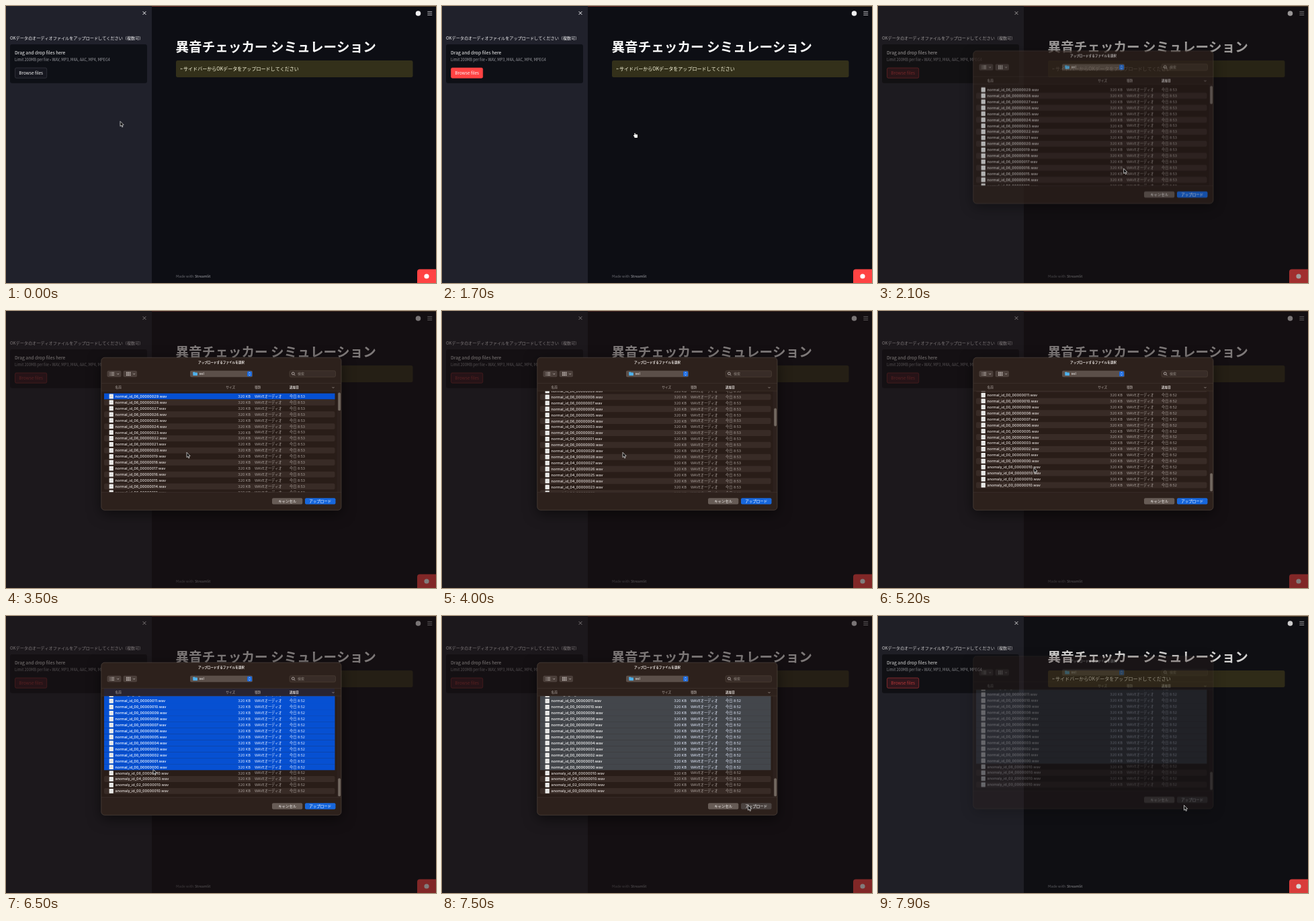
Recreate the animation shown at these times as an HTML page with a canvas. Size 640x412 px, loop 8 s.

```html
<!DOCTYPE html>
<html lang="ja">
<head>
<meta charset="utf-8">
<title>異音チェッカー シミュレーション</title>
<style>
  html, body { margin: 0; width: 100%; height: 100%; overflow: hidden; background: #0d0e14; }
  canvas { display: block; width: 640px; height: 412px; }
</style>
</head>
<body>
<canvas id="stage"></canvas>
<script>
const W = 640, H = 412, LOOP = 8000, STEP = 100;
const PAGE = '"Noto Sans CJK JP", "Noto Sans CJK", sans-serif';
const MAC = 'Inter, "Noto Sans CJK JP", "Noto Sans CJK", sans-serif';
const ROW = 8.93, ROWS = 124, MAX_SCROLL = 965;
const scale = Math.max(1, window.devicePixelRatio || 1);

function setup(canvas) {
  canvas.width = W * scale;
  canvas.height = H * scale;
  const ctx = canvas.getContext('2d');
  ctx.scale(scale, scale);
  return ctx;
}
const stage = setup(document.getElementById('stage'));
const sheet = setup(document.createElement('canvas'));
let g = stage;

// Key points: [time, value, value...]
const cursorKeys = [
  [300, 170, 171.5], [900, 36, 98], [1100, 36, 98], [1400, 285, 189],
  [1700, 285, 189], [2400, 418, 276], [2900, 173.5, 129], [3100, 173.5, 129],
  [3500, 269, 210.3], [4900, 269, 210.3], [5200, 232, 233], [5500, 219, 235],
  [6000, 219, 228], [6500, 219, 228], [7300, 455.5, 281.5]
];
const scrollKeys = [
  [3700, 0], [3900, 90], [4200, 380], [4500, 552.7], [4600, 560],
  [4900, 860], [5100, 965.5], [5200, 966.4], [5500, MAX_SCROLL]
];

const clamp = v => Math.min(1, Math.max(0, v));
const ramp = (t, from, to) => clamp((t - from) / (to - from));
const smooth = p => p * p * (3 - 2 * p);

function track(keys, t, ease = p => p) {
  let i = 0;
  while (i < keys.length - 2 && t > keys[i + 1][0]) i++;
  const a = keys[i], b = keys[i + 1];
  const p = ease(ramp(t, a[0], b[0]));
  return a.slice(1).map((v, k) => v + (b[k + 1] - v) * p);
}

function box(x, y, w, h, r, fill, stroke, lw = 0.6) {
  g.beginPath();
  g.roundRect(x, y, w, h, r);
  if (fill) { g.fillStyle = fill; g.fill(); }
  if (stroke) { g.strokeStyle = stroke; g.lineWidth = lw; g.stroke(); }
}

function dot(x, y, r, fill) {
  g.beginPath();
  g.arc(x, y, r, 0, Math.PI * 2);
  g.fillStyle = fill;
  g.fill();
}

function line(points, color, lw = 0.7) {
  g.beginPath();
  points.forEach(([x, y], i) => i ? g.lineTo(x, y) : g.moveTo(x, y));
  g.strokeStyle = color;
  g.lineWidth = lw;
  g.stroke();
}

// y is the middle of the line of text
function text(s, x, y, size, color, family = PAGE, weight = 400, align = 'left') {
  g.font = `${weight} ${size}px ${family}`;
  g.textAlign = align;
  g.textBaseline = 'alphabetic';
  g.fillStyle = color;
  g.fillText(s, x, y + size * 0.36);
}

const chevron = (x, y, r, color) => line([[x - r, y - r / 2], [x, y + r / 2], [x + r, y - r / 2]], color);

function drawButton(t, dim) {
  let fill = '#16171f', edge = '#40414a', ink = '#fafafa';
  if (t >= 1100 && t < 1800) {
    fill = edge = '#ff4343';
  } else if (t >= 900) {
    edge = ink = `rgba(255,72,72,${0.9 - 0.35 * dim})`;
    if (t >= 1800) fill = '#36171f';
  }
  box(13.5, 92, 47.2, 15.2, 2, fill, edge);
  text('Browse files', 37.2, 99.6, 6.42, ink, PAGE, 400, 'center');
}

function drawPage(t, dim) {
  g.fillStyle = '#0d0e14';
  g.fillRect(0, 0, W, H);
  const glow = g.createLinearGradient(217, 0, W, 0);
  glow.addColorStop(0, '#6e2f2a');
  glow.addColorStop(1, '#5f4a30');
  g.fillStyle = glow;
  g.fillRect(217, 0, W - 217, 1);

  g.fillStyle = '#20212b';
  g.fillRect(0, 0, 217, H);
  line([[203.6, 8.1], [208.4, 12.9]], '#f4f4f6', 1);
  line([[208.4, 8.1], [203.6, 12.9]], '#f4f4f6', 1);
  text('OKデータのオーディオファイルをアップロードしてください（複数可）', 6, 47.5, 6.13, '#f4f4f6');
  box(6, 57, 204, 57.7, 3, '#0e1016');
  text('Drag and drop files here', 13, 69.5, 6.8, '#fafafa');
  text('Limit 200MB per file • WAV, MP3, M4A, AAC, MP4, MPEG4', 13, 80.5, 5.55, '#9a9ba1');
  drawButton(t, dim);

  text('異音チェッカー シミュレーション', 252.5, 61, 19.6, '#fafafa', PAGE, 700);
  box(253, 81, 352.5, 25, 2.5, '#33301a');
  text('←', 259.6, 93.4, 5, '#fffde0', '"DejaVu Sans", sans-serif');
  text('サイドバーからOKデータをアップロードしてください', 264, 93.5, 7.05, '#fffde0');

  text('Made with', 253, 402, 5.45, '#6a6b72');
  text('Streamlit', 281, 402, 5.45, '#a2a3a9', PAGE, 500);
  dot(613.5, 11, 3.8, '#f0f0f2');
  for (const y of [8.4, 10.9, 13.4]) line([[627.3, y], [634.2, y]], '#d8d8dc', 0.8);
  box(612, 391.5, 30, 22, [4, 0, 0, 0], '#ff4343');
  dot(626, 402, 3.6, '#fff');
}

function fileName(i) {
  const two = n => String(n).padStart(2, '0');
  if (i >= 120) return `anomaly_id_${two(6 - 2 * (i - 120))}_00000010.wav`;
  return `normal_id_${two(6 - 2 * Math.floor(i / 30))}_000000${two(29 - i % 30)}.wav`;
}

function drawFile(i, y, fill) {
  const x = 146, w = 343.5, top = y - ROW / 2;
  if (fill) {
    g.fillStyle = fill;
    g.fillRect(x, top, w, ROW + 0.1);
  } else if (i % 2) {
    box(x, top, w, ROW, 2, '#382b26');
  }
  const ink = fill ? '#fff' : '#e6e0dd', soft = fill ? '#e4ecff' : '#a89f9a';
  box(153.6, y - 3.4, 6.2, 6.8, 0.5, '#eeeeec');
  line([[155.2, y + 1.4], [156.7, y - 0.8], [158.2, y + 0.8]], '#b9b9b9', 0.5);
  text(fileName(i), 162.6, y, 5.45, ink, MAC, 500);
  text('320 KB', 364, y, 5.4, soft, MAC, 400, 'right');
  text('WAVEオーディオ', 370, y, 5.2, soft, MAC);
  text(i < 77 ? '今日 8:53' : '今日 8:52', 422, y, 5.25, soft, MAC);
}

function drawList(t, scroll) {
  const picked = t >= 6500 ? 120 : t >= 3100 ? 1 : 0;
  const mark = t >= 7500 ? '#43464b' : '#0650d2';
  g.save();
  g.beginPath();
  g.rect(142, 119, 357, 150.5);
  g.clip();
  g.fillStyle = '#291d18';
  g.fillRect(142, 119, 357, 151);
  for (let i = 0; i < ROWS; i++) {
    const y = 127 + i * ROW - scroll;
    if (y > 112 && y < 276) drawFile(i, y, i < picked && mark);
  }
  g.fillStyle = '#33272280';
  g.fillRect(492.5, 119, 6.5, 151);
  box(494.2, 121.3 + 120 * clamp(scroll / MAX_SCROLL), 3.8, 27, 1.9, '#71675f');
  g.restore();
  if (picked > 1 && t < 7500) {
    g.fillStyle = 'rgba(10,60,190,.13)';
    g.fillRect(146, 108, 343, 11);
  }
}

function drawToolbar() {
  const face = '#4b3f3a', ink = '#d8d0cc';
  box(150.5, 88.8, 21, 9.4, 2, face);
  box(174.5, 88.8, 20.5, 9.4, 2, face);
  for (const y of [91.4, 93.5, 95.6]) {
    dot(155, y, 0.5, ink);
    line([[156.6, y], [161.2, y]], ink, 0.7);
    for (const x of [179, 181.4, 183.8]) box(x, y - 0.7, 1.6, 1.4, 0.2, ink);
  }
  chevron(166.7, 93.6, 1.4, ink);
  chevron(190.6, 93.6, 1.4, ink);

  box(274, 88.8, 93, 9.4, 2, '#5b4f49');
  box(278.3, 90.8, 3, 2, 0.5, '#55b4ea');
  box(278.3, 91.5, 6.6, 4.6, 0.6, '#4fb0ea');
  text('sel', 287.4, 93.5, 5.4, '#f2eeec', MAC);
  box(359, 89.7, 7, 7.6, 1.6, '#1768e0');
  line([[361.2, 92.7], [362.5, 91.3], [363.8, 92.7]], '#fff');
  line([[361.2, 94.4], [362.5, 95.8], [363.8, 94.4]], '#fff');

  box(422, 88.8, 68.5, 9.4, 2, '#382c27', '#54483f', 0.5);
  g.beginPath();
  g.arc(427.3, 93, 1.9, 0, Math.PI * 2);
  g.strokeStyle = ink;
  g.lineWidth = 0.7;
  g.stroke();
  line([[428.7, 94.4], [430.4, 96.1]], ink);
  text('検索', 434, 93.5, 5, '#8d837d', MAC);
}

function drawDialog(t, scroll) {
  sheet.clearRect(0, 0, W, H);
  g = sheet;
  g.save();
  g.shadowColor = 'rgba(0,0,0,.55)';
  g.shadowBlur = 20 * scale;
  g.shadowOffsetY = 5 * scale;
  box(141.8, 69.2, 357.2, 227, 5, '#2d211c');
  g.restore();
  text('アップロードするファイルを選択', 320.5, 76.6, 4.6, '#f0ebe8', MAC, 700, 'center');
  drawToolbar();
  line([[142, 107.5], [499, 107.5]], '#41352f', 0.6);
  drawList(t, scroll);
  const head = '#b9b0ab';
  text('名前', 162.6, 113.8, 4.6, head, MAC, 500);
  text('サイズ', 341, 113.8, 4.6, head, MAC, 500, 'right');
  text('種類', 370, 113.8, 4.6, head, MAC, 500);
  text('追加日', 422, 113.8, 4.6, '#f0ebe8', MAC, 700);
  chevron(487, 113.8, 1.5, head);
  line([[142, 119], [499, 119]], '#41352f', 0.5);
  line([[142, 269.7], [499, 269.7]], '#41352f', 0.6);
  const upload = t >= 7500 ? '#4b4340' : t >= 7400 ? '#3d88f0' : '#1767dc';
  box(396, 278.2, 45.3, 9.4, 2, '#675c56');
  text('キャンセル', 418.7, 282.9, 5.4, '#f2eeec', MAC, 400, 'center');
  box(445, 278.2, 45.5, 9.4, 2, upload);
  text('アップロード', 467.7, 282.9, 5.5, '#fff', MAC, 400, 'center');
  box(141.8, 69.2, 357.2, 227, 5, null, '#5a4d46', 0.6);
  g = stage;
}

function drawArrow(x, y) {
  const pts = [[0, 0], [0, 7.4], [1.7, 5.9], [2.8, 8.6], [4, 8.1], [2.9, 5.5], [5.2, 5.3]];
  g.beginPath();
  pts.forEach(([a, b]) => g.lineTo(x + a, y + b));
  g.closePath();
  g.fillStyle = '#0a0a0a';
  g.fill();
  g.strokeStyle = '#f2f2f2';
  g.lineWidth = 0.7;
  g.lineJoin = 'round';
  g.stroke();
}

function drawHand(x, y) {
  const parts = [[1.4, 0, 1.4, 5], [2.6, 2, 3.4, 3], [0, 3.1, 2.2, 1.7], [1.3, 3.2, 4.7, 3.8]];
  for (const [a, b, w, h] of parts) box(x + a, y + b, w, h, 0.7, null, '#101010', 1.1);
  for (const [a, b, w, h] of parts) box(x + a, y + b, w, h, 0.7, '#fff');
}

function render(t) {
  const opened = smooth(ramp(t, 1700, 2300));
  const closed = ramp(t, 7500, 7900);
  const dim = opened * (1 - 0.7 * closed);
  const alpha = opened * (1 - 0.64 * closed);
  const lift = 9.5 * (1 - opened + smooth(closed));

  drawPage(t, dim);
  if (alpha > 0) {
    g.fillStyle = `rgba(26,18,17,${0.55 * dim})`;
    g.fillRect(0, 0, W, H);
    drawDialog(t, track(scrollKeys, t)[0]);
    g.globalAlpha = alpha;
    g.drawImage(sheet.canvas, 0, -lift, W, H);
    g.globalAlpha = 1;
  }
  const [x, y] = track(cursorKeys, t, smooth);
  if (t >= 900 && t < 1900) drawHand(x, y);
  else drawArrow(x, y);
}

const start = performance.now();
function tick() {
  const t = (performance.now() - start) % LOOP;
  render(Math.floor(t / STEP) * STEP);
  requestAnimationFrame(tick);
}
tick();
</script>
</body>
</html>
```
